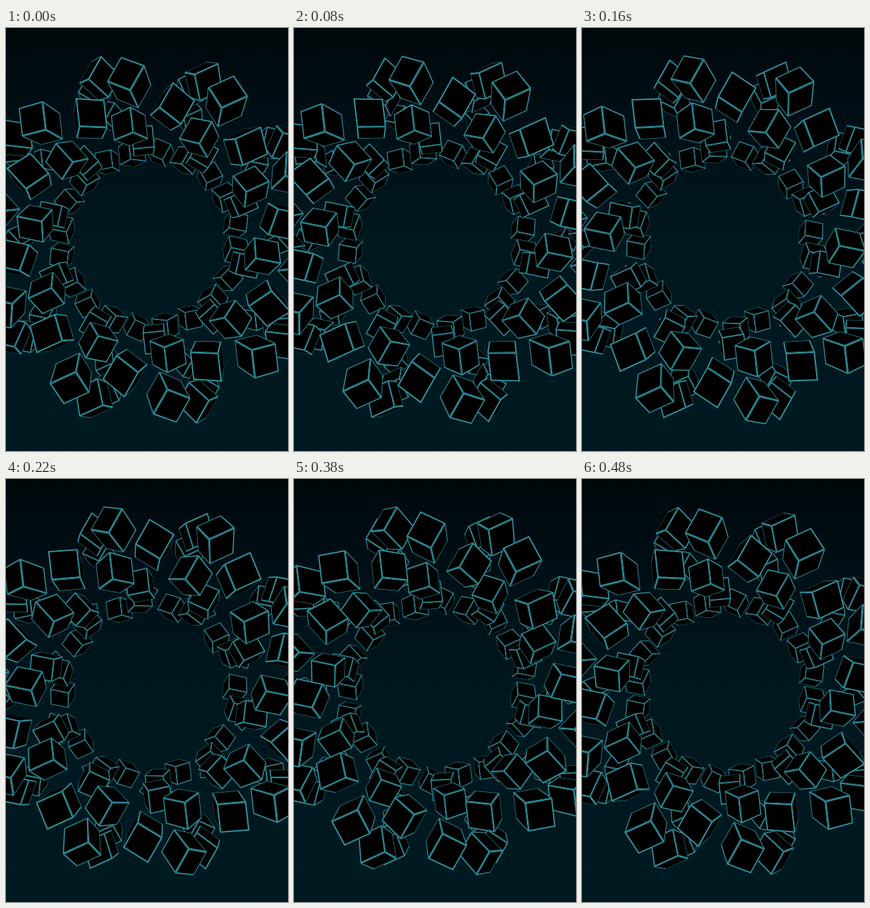
Animation, 400 px wide and 600 px high, one loop 500 ms. Source, as an HTML page with a canvas:

```html
<!DOCTYPE html>
<html lang="en">
<head>
<meta charset="utf-8">
<title>Interlocked rings of cubes</title>
<style>
  html, body { margin: 0; height: 100%; overflow: hidden; background: #000; }
  canvas { display: block; }
</style>
</head>
<body>
<canvas width="400" height="600"></canvas>
<script>
const ctx = document.querySelector('canvas').getContext('2d');
const LOOP = 500, COUNT = 10, STEP = Math.PI * 2 / COUNT;
const CENTER_X = 202.5, CENTER_Y = 300.5;
const DISTANCE = 386;      // camera to the plane of the ring centres
const ORBIT = 162;         // ring centres to the middle of the stage
const RADIUS = 87;         // ring radius
const HALF = 15.2, BORDER = 1.4;
const PHASE = 2 * Math.PI / 180;
const TILT = 29.5 * Math.PI / 180;
const TILT_COS = Math.cos(TILT), TILT_SIN = Math.sin(TILT);
const SQUARE = [[-1, -1], [1, -1], [1, 1], [-1, 1]];

const sky = ctx.createLinearGradient(0, 0, 0, 600);
sky.addColorStop(0, '#00070b');
sky.addColorStop(0.2, '#000f15');
sky.addColorStop(0.5, '#00171e');
sky.addColorStop(1, '#001a21');

// Projects an offset (radial, tangential, axial) from a cube's centre.
function project([radial, tangential, axial], cos, sin) {
  const along = (RADIUS + radial) * cos - tangential * sin;
  const depth = (RADIUS + radial) * sin + tangential * cos;
  const scale = DISTANCE / (DISTANCE - depth);
  return [
    scale * (axial * TILT_SIN - along * TILT_COS),
    -scale * (ORBIT + along * TILT_SIN + axial * TILT_COS)
  ];
}

function makeCube(angle) {
  const cos = Math.cos(angle), sin = Math.sin(angle);
  // Camera position along the cube's own three axes
  const camera = [
    DISTANCE * sin - ORBIT * TILT_SIN * cos - RADIUS,
    DISTANCE * cos + ORBIT * TILT_SIN * sin,
    -ORBIT * TILT_COS
  ];
  const faces = [];
  camera.forEach((position, axis) => {
    if (Math.abs(position) <= HALF) return;
    const outline = size => SQUARE.map(([u, v]) => {
      const offset = [];
      offset[axis] = Math.sign(position) * HALF;
      offset[(axis + 1) % 3] = u * size;
      offset[(axis + 2) % 3] = v * size;
      return project(offset, cos, sin);
    });
    const outer = new Path2D(), frame = new Path2D();
    addPolygon(outer, outline(HALF));
    frame.addPath(outer);
    addPolygon(frame, outline(HALF - BORDER));
    faces.push({ outer, frame });
  });
  return { faces, distance: Math.hypot(...camera) };
}

function addPolygon(path, points) {
  points.forEach(([x, y], i) => i ? path.lineTo(x, y) : path.moveTo(x, y));
  path.closePath();
}

function draw(now) {
  const progress = now % LOOP / LOOP;
  ctx.setTransform(1, 0, 0, 1, 0, 0);
  ctx.fillStyle = sky;
  ctx.fillRect(0, 0, 400, 600);

  const cubes = Array.from({ length: COUNT }, (_, i) => makeCube(PHASE + (i - progress) * STEP));
  cubes.sort((a, b) => b.distance - a.distance);
  for (const { faces } of cubes) {
    for (let ring = 0; ring < COUNT; ring++) {
      ctx.setTransform(1, 0, 0, 1, CENTER_X, CENTER_Y);
      ctx.rotate(ring * STEP);
      for (const { outer, frame } of faces) {
        ctx.fillStyle = '#000';
        ctx.fill(outer);
        ctx.fillStyle = '#2f96a3';
        ctx.fill(frame, 'evenodd');
      }
    }
  }
}

function tick() {
  draw(performance.now());
  requestAnimationFrame(tick);
}
tick();
</script>
</body>
</html>
```
